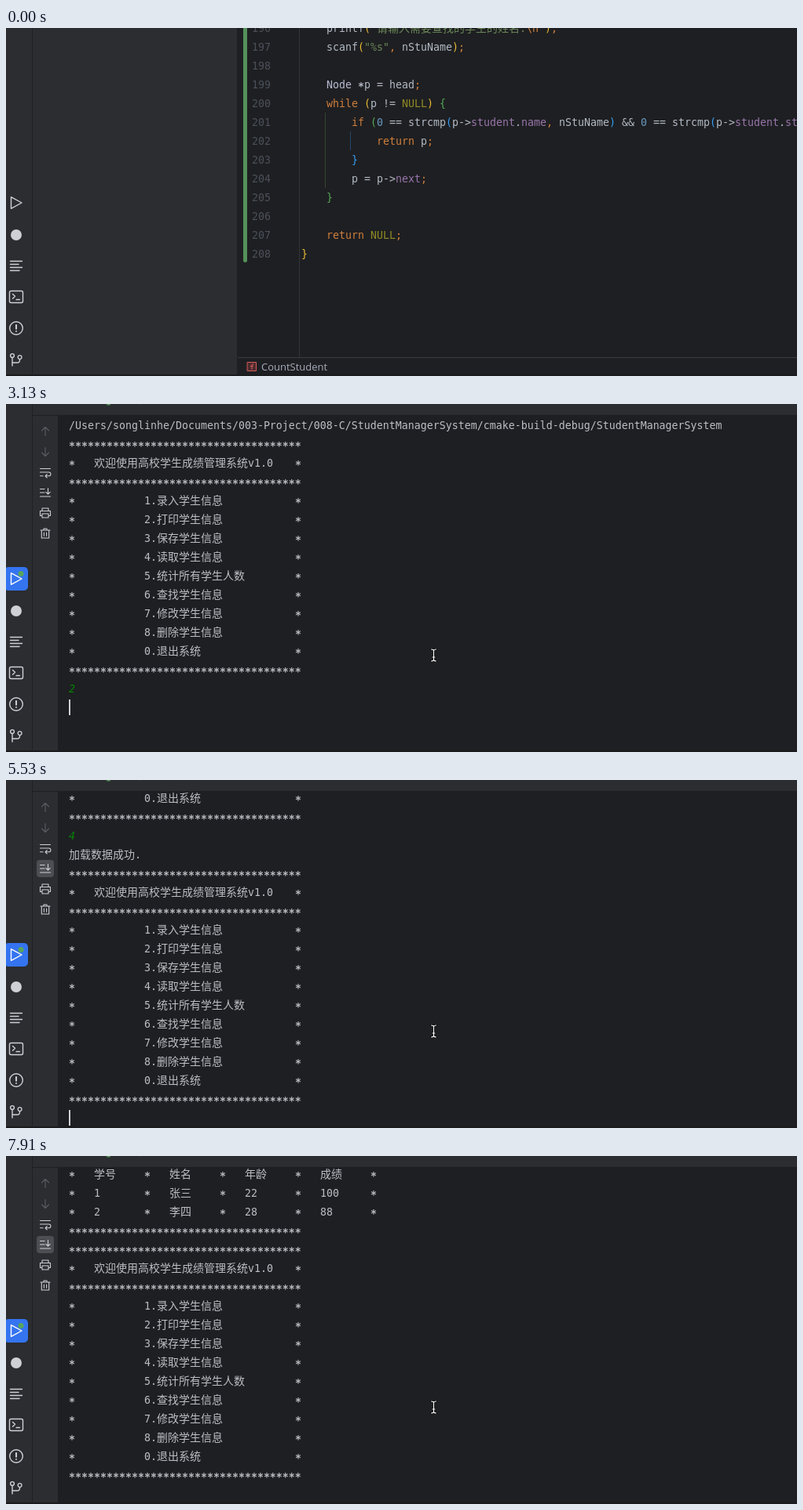
Animation, 1007 px wide and 444 px high, one loop 8000 ms. Source, as an HTML page with a canvas:

```html
<!DOCTYPE html>
<html lang="zh">
<head>
<meta charset="utf-8">
<style>
html, body { margin: 0; width: 100%; height: 100%; overflow: hidden; background: #1e1f22; }
canvas { display: block; }
</style>
</head>
<body>
<canvas id="stage" width="1007" height="444"></canvas>
<script>
const ctx = document.getElementById('stage').getContext('2d');
const LOOP = 8000, RUN = 590, TICK = 149.4; // ms; the console moves in whole ticks after RUN
const COL = 8, ROW = 24, LEFT = 80, TOP = 27, BOTTOM = 431;
const PANEL = '#2b2d30', EDITOR = '#1e1f22', TEXT = '#bcbec4', ICON = '#ced0d6', DIM = '#5a5d63';
const MONO = '13.29px "DejaVu Sans Mono", monospace';
const CJK = '500 14px "Noto Sans CJK SC", "Noto Sans CJK", sans-serif';

const mix = (a, b, p) => a + (b - a) * p;
const ramp = (t, a, b) => Math.min(1, Math.max(0, (t - a) / (b - a)));

function box(x, y, w, h, color, radius = 0) {
  ctx.fillStyle = color;
  ctx.beginPath();
  ctx.roundRect(x, y, w, h, radius);
  ctx.fill();
}

// Draws a run of mixed Latin and Chinese centred on y; returns the end x.
function write(str, x, y, color = TEXT, style = '') {
  ctx.fillStyle = color;
  for (const run of str.match(/\*+|[ -)+-~]+|[^ -~]+/g) || []) {
    const wide = run.charCodeAt(0) > 126, star = run[0] === '*';
    ctx.font = wide ? CJK : style + (star ? 'bold ' : '') + MONO;
    ctx.fillText(run, x, y + (star ? 7 : 5));
    x += run.length * (wide ? 14 : COL);
  }
  return x;
}

function icon(path, x, y, color = ICON, width = 1.4) {
  ctx.save();
  ctx.translate(x, y);
  ctx.strokeStyle = color;
  ctx.lineWidth = width;
  ctx.lineJoin = ctx.lineCap = 'round';
  ctx.stroke(new Path2D(path));
  ctx.restore();
}

// ---- Editor ----
const INK = {
  d: '#b3bac4', o: '#cf7f3c', n: '#908b25', p: '#9876aa', b: '#6897bb',
  s: '#6a8759', t: '#b9bcd1', 1: '#e8ba36', 2: '#54a857', 3: '#359ff4'
};
const CODE = [
  '    ~dprintf~1(~s"请输入需要查找的学生的姓名:~o\\n~s"~1)~o;',
  '    ~dscanf~1(~s"%s"~o, ~dnStuName~1)~o;',
  '',
  '    ~tNode ~d*p = head~o;',
  '    ~owhile ~1(~dp != ~nNULL~1) ~2{',
  '        ~oif ~2(~b0 ~d== strcmp~3(~dp->~pstudent~d.~pname~o, ~dnStuName~3) ~d&& ~b0 ~d== strcmp~3(~dp->~pstudent~d.~pstuNum',
  '            ~oreturn ~dp~o;',
  '        ~3}',
  '        ~dp = p->~pnext~o;',
  '    ~2}',
  '',
  '    ~oreturn ~nNULL~o;',
  '~1}'
];

function drawEditor() {
  box(34, 0, 260, 444, PANEL);
  box(302, -8, 5, 307, '#549159', 2.5);
  box(373, 0, 1, 420, '#313438');
  box(406, 108, 1, 96, '#33472f');
  box(438, 132, 1, 24, '#24476a');
  CODE.forEach((line, i) => {
    const y = i * ROW;
    write(String(196 + i), 313, y, '#4b5059');
    let x = 376;
    line.split('~').forEach((part, k) => {
      x = k ? write(part.slice(1), x, y, INK[part[0]]) : x + part.length * COL;
    });
  });
  box(295, 420, 712, 1, '#393b40');
  box(307.5, 426.5, 11, 11, '#4a2b2d', 2);
  icon('M-5.5 -5.5H5.5V5.5H-5.5Z', 313, 432, '#db5c5c', 1);
  icon('M2 -3.2Q0 -3.6 0 -1.5V3.5M-1.6 -.6H1.6', 313, 432, '#db5c5c', 1);
  ctx.font = '13px "Open Sans", "Noto Sans", sans-serif';
  ctx.fillStyle = '#a8adbd';
  ctx.fillText('CountStudent', 325, 437);
}

// ---- Console text ----
const STARS = '*'.repeat(37);
const framed = (str, x) => [[LEFT, '*'], [x, str], [368, '*']];
const full = str => [[LEFT, str]];
const input = str => [[LEFT, str, '#058505', 'italic ']];
const row = cells => [...cells.flatMap((c, i) => [[LEFT + 96 * i, '*'], [112 + 96 * i, c]]), [LEFT + 96 * cells.length, '*']];
const banner = [full(STARS), framed('欢迎使用高校学生成绩管理系统v1.0', 112), full(STARS)];
const choices = ['录入学生信息', '打印学生信息', '保存学生信息', '读取学生信息', '统计所有学生人数',
  '查找学生信息', '修改学生信息', '删除学生信息'].map((s, i) => `${i + 1}.${s}`).concat('0.退出系统');
const menu = [...banner, ...choices.map(s => framed(s, 176)), full(STARS)];
const table = (...rows) => [...banner, row(['学号', '姓名', '年龄', '成绩']), ...rows.map(row), full(STARS)];

const OPENING = [
  full('/Users/songlinhe/Documents/003-Project/008-C/StudentManagerSystem/cmake-build-debug/StudentManagerSystem'),
  ...menu
];
// Each command is typed, entered and answered at the given ticks.
const COMMANDS = [
  { key: '2', typed: 12, enter: 17, print: 19, reply: [...table(), ...menu] },
  { key: '4', typed: 27, enter: 31, print: 32, reply: [full('加载数据成功.'), ...menu] },
  { key: '2', typed: 41, enter: 42, print: 43,
    reply: [...table(['1', '张三', '22', '100'], ['2', '李四', '28', '88']), ...menu] }
];
const CLICK = 5, CLICKED_LINE = 11;
const follow = line => Math.max(0, TOP + line * ROW - BOTTOM);

// Replays the commands up to a tick.
function session(tick) {
  let lines = tick > 0 ? OPENING : OPENING.slice(0, 1);
  let line = lines.length, col = 0, since = 0, scroll = 0;
  if (tick >= CLICK) [line, col, since] = [CLICKED_LINE, STARS.length, CLICK];
  for (const { key, typed, enter, print, reply } of COMMANDS) {
    if (tick < typed) break;
    lines = [...lines, input(key)];
    [line, col, since] = [lines.length - 1, 1, tick];
    scroll = follow(line);
    if (tick < enter) break;
    [line, col, since] = [lines.length, 0, enter];
    scroll = follow(line);
    if (tick < print) break;
    lines = [...lines, ...reply];
    [line, since] = [lines.length, print];
    // Once the view follows the output, a scroll takes one tick to settle.
    scroll = mix(scroll, follow(line), scroll && tick === print ? 0.706 : 1);
  }
  return { lines, line, col, scroll, caretOn: (tick - since) % 7 < 3 };
}

// ---- Console drawing ----
function drawTools(following) {
  icon('M0 5.5V-5.5M-4.5 -1L0 -5.5L4.5 -1', 50, 35, DIM, 1.1);
  icon('M0 -5.5V5.5M-4.5 1L0 5.5L4.5 1', 50, 61, DIM, 1.1);
  icon('M-6.5 -4.5H6.5M-6.5 0H4.5A2.4 2.4 0 0 1 4.5 4.8H0M2.2 2.6L0 4.8L2.2 7M-6.5 4.8H-3', 50, 87, ICON, 1.1);
  if (following) box(39, 102, 22, 22, '#4c4e53', 4);
  icon('M-6.5 -4.5H-1M-6.5 0H-1M-6.5 5H6.5M3.5 -5.5V2M.8 -.6L3.5 2L6.2 -.6', 50, 113, ICON, 1.1);
  icon('M-4 -2.5V-6H4V-2.5M-4 3.5H-6.5V-2.5H6.5V3.5H4M-4 1H4V6H-4Z', 50, 139, ICON, 1.1);
  icon('M-6 -4H6M-2 -4V-6H2V-4M-4.7 -4V6H4.7V-4M-1.6 -1V3.2M1.6 -1V3.2', 50, 165, ICON, 1.1);
}

// Sweeps in from the run button, clicks, then drifts down and rests.
function drawPointer(tick) {
  const sweep = 1 - (1 - ramp(tick, 1, CLICK)) ** 2, rest = ramp(tick, 7, 9);
  const x = mix(880, 545, sweep) - rest + 0.5;
  const y = mix(40, 291, sweep) + 27 * ramp(tick, CLICK, 7) + 2 * rest + 0.5;
  const beam = 'M-3 -7.5Q0 -7.5 0 -5.5Q0 -7.5 3 -7.5M0 -5.5V5.5M-3 7.5Q0 7.5 0 5.5Q0 7.5 3 7.5M-1.5 2.5H1.5';
  icon(beam, x, y, '#000', 2.6);
  icon(beam, x, y, '#fff', 1.2);
}

function drawConsole(tick) {
  const { lines, line, col, scroll, caretOn } = session(tick);
  const lineY = i => TOP + i * ROW - scroll;
  box(34, 0, 973, 14, PANEL);
  box(34, 15, 32, 429, PANEL);
  box(128, 0, 5, 1.5, '#57965c', 1);
  box(170, 0, 1, 1, '#43454a');
  drawTools(scroll > 0);

  ctx.save();
  ctx.beginPath();
  ctx.rect(66, 15, 941, 426);
  ctx.clip();
  lines.forEach((parts, i) => {
    for (const [x, ...rest] of parts) write(rest[0], x, lineY(i), rest[1], rest[2]);
  });
  if (caretOn) box(LEFT + col * COL, lineY(line) - 10, 2, 20, ICON);
  ctx.restore();
  if (tick > 0) drawPointer(tick);
}

function drawSidebar(running) {
  box(0, 0, 33, 444, PANEL);
  if (running) box(-2, 208, 30, 30, '#3574f0', 5);
  icon('M-6.5 -7.3L7 0L-6.5 7.3Z', 13, 223, running ? '#fff' : ICON);
  if (running) box(15.5, 213, 7, 7, '#57a55c', 3.5);
  box(6, 257, 14, 14, ICON, 7);
  icon('M-7.5 -6H7.5M-7.5 -2H3M-7.5 2H7.5M-7.5 6H4', 13, 303.5);
  icon('M-6.5 -7.5H6.5Q8.5 -7.5 8.5 -5.5V5.5Q8.5 7.5 6.5 7.5H-6.5Q-8.5 7.5 -8.5 5.5V-5.5Q-8.5 -7.5 -6.5 -7.5ZM-4.5 -3.5L-1.5 -.7L-4.5 2.2M0 3.5H4.5', 13, 343);
  icon('M8.3 0A8.3 8.3 0 1 1 -8.3 0A8.3 8.3 0 1 1 8.3 0', 13, 383);
  icon('M0 -4V.8M0 4V4.1', 13, 383, ICON, 2);
  icon('M-2.6 -5A2.4 2.4 0 1 1 -7.4 -5A2.4 2.4 0 1 1 -2.6 -5M7 -3A2.4 2.4 0 1 1 2.2 -3A2.4 2.4 0 1 1 7 -3M-5 -2.6V8M-5 4H1.5Q4.6 4 4.6 -.6', 13, 423);
}

function draw(t) {
  const running = t >= RUN;
  box(0, 0, 1007, 444, EDITOR);
  if (running) drawConsole(Math.floor((t - RUN) / TICK + 0.1));
  else drawEditor();
  drawSidebar(running);
  box(0, 442, 1007, 2, '#1a1b1d');
}

const start = performance.now();
function loop() {
  draw((performance.now() - start) % LOOP);
  requestAnimationFrame(loop);
}
loop();
</script>
</body>
</html>
```
